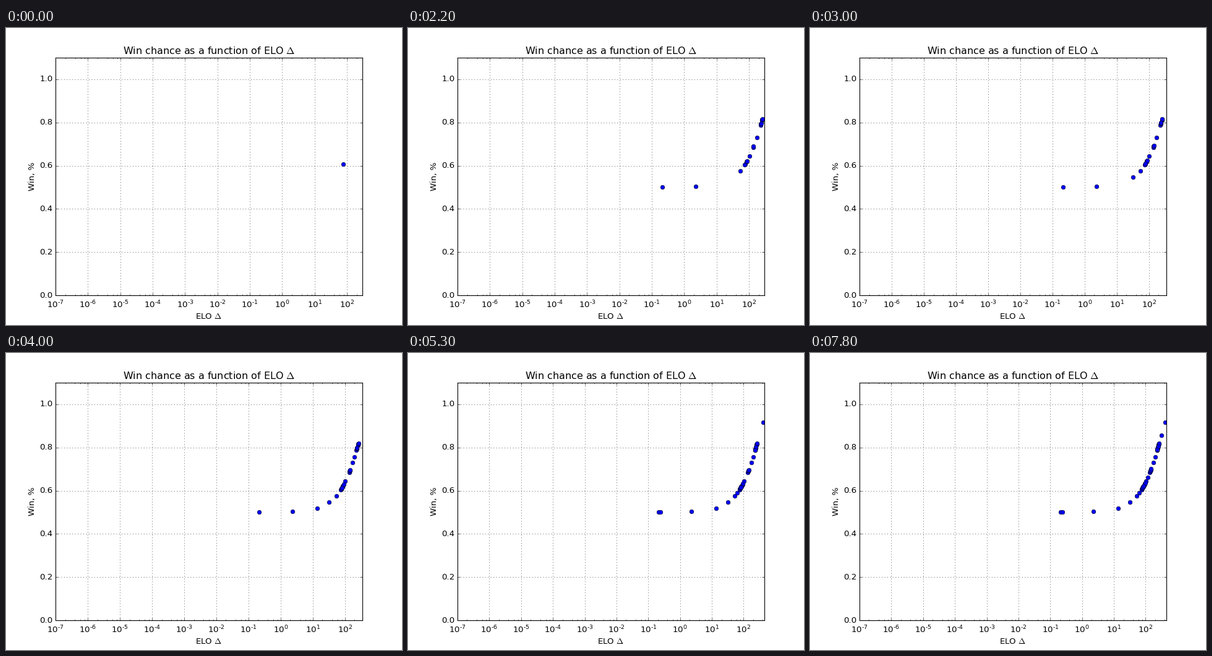
Write a matplotlib script that moves like this. It is 640 by 480 pixels and loops after 8000 ms.

```python
import matplotlib.pyplot as plt
import numpy as np
from matplotlib.animation import FuncAnimation
from matplotlib.ticker import FuncFormatter, LogLocator, NullFormatter

plt.style.use("classic")

STEP = 100    # ms per frame
STEPS = 80
GOLDEN = 0.618034

# Games that stand alone on the curve: {step: rating difference}
LONE_GAMES = {0: 76, 8: 53.5, 10: 0.211, 11: 2.3, 20: 174, 26: 32.5, 34: 13.7,
              40: 196.7, 41: 63.3, 45: 0.2445, 53: 416.7, 68: 311}
# Right end of the x axis, from a step on
LIMITS = {0: 300, 23: 350, 53: 450}

# All other games fall in three bands, taken in turn
CLOSE, MEDIUM, WIDE = (73, 104), (115, 150), (225, 264)
TURNS = (WIDE, WIDE, CLOSE, CLOSE, MEDIUM)
CLUSTERED = 30


def clustered_game(k):
    """Step and rating difference of game k; games get rarer with time."""
    step = round(1 + 1.85 * k + 25 * (k / CLUSTERED) ** 5)
    low, high = TURNS[k % len(TURNS)]
    return step, low + (high - low) * ((0.1 + k * GOLDEN) % 1)


def win_chance(delta):
    return 1 / (1 + 10 ** (-delta / 400))


def power_label(value, pos):
    exponent = str(round(np.log10(value))).replace("-", "\u2010")
    return rf"$\mathdefault{{10^{{{exponent}}}}}$"


games = sorted([*LONE_GAMES.items(), *map(clustered_game, range(CLUSTERED))])
steps, deltas = np.array(games).T

fig, ax = plt.subplots(figsize=(8, 6), dpi=80, facecolor="white")
ax.set_xscale("log")
ax.set_ylim(0, 1.1)
ax.set_yticks(np.arange(6) / 5)
ax.xaxis.set_major_locator(LogLocator(numticks=20))
ax.xaxis.set_major_formatter(FuncFormatter(power_label))
ax.xaxis.set_minor_locator(LogLocator(subs=(2, 4, 6, 8), numticks=20))
ax.xaxis.set_minor_formatter(NullFormatter())
ax.tick_params(axis="x", pad=5.8)
ax.grid(True)
ax.set_title(r"Win chance as a function of ELO $\Delta$")
ax.set_xlabel(r"ELO $\Delta$", labelpad=4.1)
ax.set_ylabel("Win, %")
dots, = ax.plot([], [], "o", color="b", markersize=6,
                markeredgecolor="k", markeredgewidth=0.5)


def draw(step):
    played = deltas[steps <= step]
    dots.set_data(played, win_chance(played))
    ax.set_xlim(1e-7, max(top for start, top in LIMITS.items() if start <= step))
    return dots,


anim = FuncAnimation(fig, draw, frames=STEPS, interval=STEP,
                     repeat=True, repeat_delay=0, blit=False)
plt.show()
```
